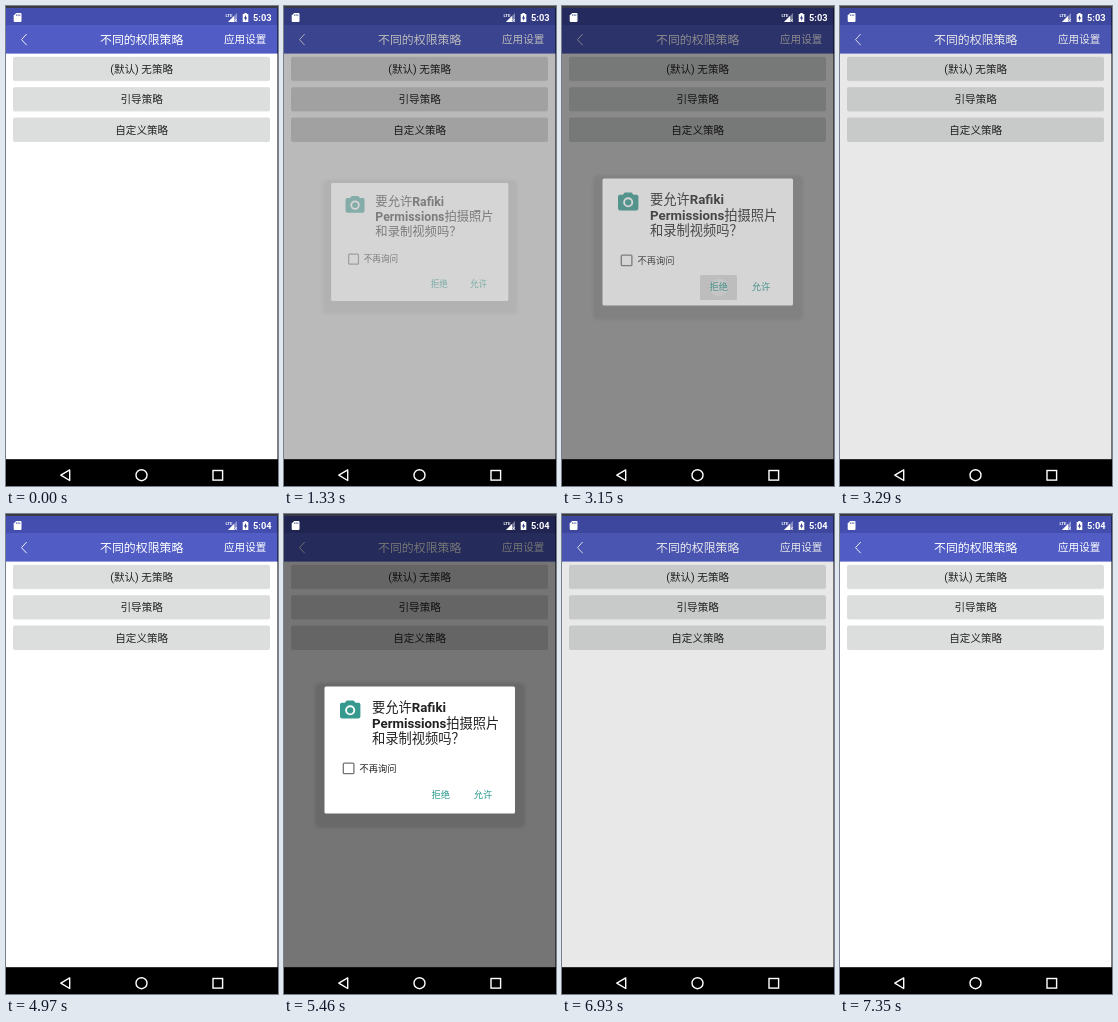
Animation, 272 px wide and 480 px high, one loop 8 s. Source, as an HTML page:

```html
<!DOCTYPE html>
<html lang="zh-CN">
<head>
<meta charset="utf-8">
<title>不同的权限策略</title>
<style>
  html, body { margin: 0; width: 100%; height: 100%; overflow: hidden; background: #000; }
  svg { display: block; width: 272px; height: 480px; }
  text { font-family: Roboto, "Noto Sans CJK SC", "Noto Sans CJK", sans-serif; }
  .mid { text-anchor: middle; }
  .light { fill: #fff; }
  .line { fill: none; stroke: #fff; }
  .button text { fill: #222; font-size: 10.58px; text-anchor: middle; }
  .body { fill: #212121; font-size: 13.25px; }
  .body tspan { font-weight: 700; }
  .small { font-size: 9.26px; }
  .action { fill: #26998c; font-size: 9.26px; text-anchor: middle; }
  .shadow { opacity: .1; filter: blur(1.5px); }

  .edge, .dim, .dialog, .zoom, .ripple, .press, .old, .new { animation: 8s step-end infinite; }
  .edge { animation-name: edge; }
  .dim { animation-name: dim; }
  .dialog { animation-name: dialog; }
  .zoom { animation-name: zoom; transform-origin: 135.5px 236.5px; }
  .deny.ripple { animation-name: deny-ripple; }
  .deny.press { animation-name: deny-press; }
  .allow.ripple { animation-name: allow-ripple; }
  .allow.press { animation-name: allow-press; }
  .old { animation-name: old; }
  .new { animation-name: new; }

  @keyframes edge { 0% { opacity: 0; } 15.75%, 100% { opacity: 1; } }
  @keyframes dim {
    0% { opacity: 0; }
    15.75%, 65.625% { opacity: .06; }
    16.625%, 66.5% { opacity: .27; }
    17.5%, 67.375% { opacity: .46; }
    18.375%, 68.25% { opacity: .54; }
    19.25%, 69.125% { opacity: .56; }
    39.375%, 84.875% { opacity: .46; }
    40.25%, 85.75% { opacity: .27; }
    41.125%, 86.625% { opacity: .09; }
    42%, 87.5% { opacity: .02; }
    42.875%, 88.375%, 100% { opacity: 0; }
  }
  @keyframes dialog {
    0% { opacity: 0; }
    16.625%, 66.5% { opacity: .4; }
    17.5%, 67.375% { opacity: .85; }
    18.375%, 68.25% { opacity: 1; }
    39.375%, 84.875% { opacity: .64; }
    40.25%, 85.75% { opacity: .18; }
    41.125%, 86.625%, 100% { opacity: 0; }
  }
  @keyframes zoom {
    0%, 42.875% { transform: scale(.93); }
    17.5%, 67.375% { transform: scale(.98); }
    18.375%, 68.25%, 100% { transform: none; }
  }
  @keyframes deny-ripple { 0%, 41.125%, 100% { opacity: 0; } 38.5% { opacity: 1; } }
  @keyframes deny-press { 0%, 41.125%, 100% { opacity: 0; } 39.375% { opacity: 1; } }
  @keyframes allow-ripple { 0%, 86.625%, 100% { opacity: 0; } 84% { opacity: 1; } }
  @keyframes allow-press { 0%, 86.625%, 100% { opacity: 0; } 84.875% { opacity: 1; } }
  @keyframes old { 0% { opacity: 1; } 62.125%, 100% { opacity: 0; } }
  @keyframes new { 0% { opacity: 0; } 62.125%, 100% { opacity: 1; } }
</style>
</head>
<body>
<svg viewBox="0 0 272 480">
  <defs>
    <g id="button">
      <rect class="edge" x="7" y=".7" width="257" height="24.3" rx="2" fill="#cbcbcb"/>
      <rect x="7" width="257" height="24.3" rx="2" fill="#dcdddd"/>
    </g>
  </defs>

  <!-- App page -->
  <rect width="272" height="480" fill="#fff"/>
  <rect y="2" width="272" height="17" fill="#434eae"/>
  <rect y="19" width="272" height="28.6" fill="#515dc4"/>
  <path class="line" d="M20.7 28L15.5 33.6L20.7 39.2" stroke-width=".9"/>
  <text class="light mid" x="135.7" y="37.8" font-size="11.9">不同的权限策略</text>
  <text class="light" x="218" y="37" font-size="10.58">应用设置</text>
  <g class="button">
    <use href="#button" y="50.8"/>
    <use href="#button" y="81.2"/>
    <use href="#button" y="111.6"/>
    <text x="135.7" y="67">(默认) 无策略</text>
    <text x="135.7" y="97.4">引导策略</text>
    <text x="135.7" y="127.8">自定义策略</text>
  </g>

  <rect class="dim" y="2" width="272" height="452"/>

  <!-- Permission dialog -->
  <g class="dialog"><g class="zoom">
    <rect class="shadow" x="31" y="169" width="210" height="145" rx="5"/>
    <rect x="40.5" y="172.5" width="190.5" height="127" rx="1.5" fill="#fff"/>
    <path fill="#36998e" d="M62.8 186.5H69.6L71.5 188.7H74.6Q76.4 188.7 76.4 190.5V202.6Q76.4 204.4 74.6 204.4H57.8Q56 204.4 56 202.6V190.5Q56 188.7 57.8 188.7H60.9Z"/>
    <circle cx="66.2" cy="196.3" r="4.1" fill="#36998e" stroke="#fff" stroke-width="1.9"/>
    <text class="body" x="88" y="197.6">要允许<tspan>Rafiki</tspan></text>
    <text class="body" x="88" y="213.6"><tspan>Permissions</tspan>拍摄照片</text>
    <text class="body" x="88" y="229">和录制视频吗？</text>
    <rect x="59.3" y="249.1" width="10.6" height="10.6" rx="1" fill="none" stroke="#757575" stroke-width="1.3"/>
    <text class="small" x="75.5" y="257.8" fill="#212121">不再询问</text>
    <rect class="deny press" x="138" y="269" width="37" height="25" rx="1.5" fill="#dadada"/>
    <circle class="deny ripple" cx="157" cy="281.5" r="9" fill="#e6e6e6"/>
    <rect class="allow press" x="180.5" y="269" width="37" height="25" rx="1.5" fill="#dadada"/>
    <circle class="allow ripple" cx="200" cy="279.5" r="8" fill="#f3f3f3"/>
    <text class="action" x="156.8" y="284.4">拒绝</text>
    <text class="action" x="199" y="284.4">允许</text>
  </g></g>

  <!-- Status bar -->
  <path class="light" d="M10.2 7H14.6Q15.5 7 15.5 7.9V15.1Q15.5 16 14.6 16H8.6Q7.7 16 7.7 15.1V9.5Z"/>
  <path d="M10.6 8.3V10M12.2 8.3V10M13.8 8.3V10" stroke="#3d4795" stroke-width=".7"/>
  <text class="light" x="219.4" y="10.6" font-size="4.4" font-weight="700">LTE</text>
  <path class="light" d="M231 7V16H222Z" opacity=".4"/>
  <path class="light" d="M228 10V16H222Z"/>
  <path class="line" d="M228.4 13.2L230.8 15.6M230.8 13.2L228.4 15.6" stroke-width=".8"/>
  <path class="light" d="M238.3 7H240.7V7.9H242.3V16H236.7V7.9H238.3Z"/>
  <path d="M240 9L237.9 12.6H239.2V15L241.2 11.4H240Z" fill="#343d88"/>
  <g class="light small" font-weight="700">
    <text class="old" x="247" y="14.8">5:03</text>
    <text class="new" x="247" y="14.8">5:04</text>
  </g>

  <!-- Frame and navigation -->
  <rect width="272" height="2" fill="#3a3a42"/>
  <rect x="271" y="2" width="1" height="452" opacity=".5"/>
  <rect y="453.2" width="272" height="27"/>
  <g class="line" stroke-width="1.4">
    <path d="M63.7 463.9V474.5L54.8 469.2Z" stroke-linejoin="round"/>
    <circle cx="135.5" cy="469.2" r="5.5"/>
    <rect x="207" y="464.5" width="9.6" height="9.6"/>
  </g>
</svg>
</body>
</html>
```
